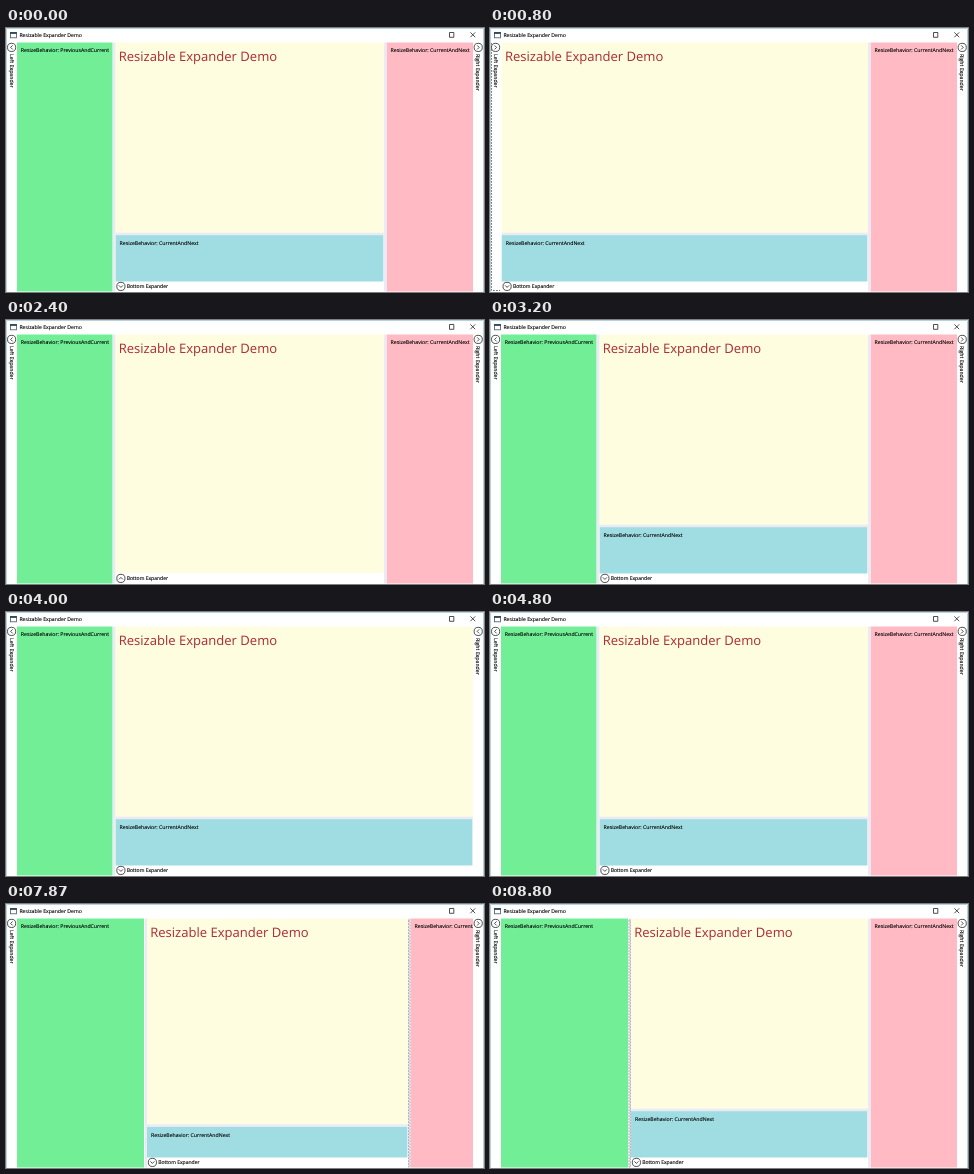
An HTML page that plays this animation: 478x264 px, repeating every 9590 ms.

```html
<!DOCTYPE html>
<html lang="en">
<head>
<meta charset="utf-8">
<title>Resizable Expander Demo</title>
<style>
html, body { margin: 0; width: 100%; height: 100%; overflow: hidden; background: #fff; }
svg { display: block; font: 5.2px "Open Sans", "Noto Sans", sans-serif; text-rendering: geometricPrecision; }
text { stroke: #000; stroke-width: .12; }
.split { fill: #ebebf6; }
.focus { fill: none; stroke: #999; stroke-width: .7; stroke-dasharray: 1.8 1.2; }
.icon { fill: none; stroke: #222; stroke-width: .8; }
</style>
</head>
<body>
<svg width="478" height="264" viewBox="0 0 478 264">
  <rect id="left" x="11" y="14.5" height="249" fill="#72ee97"/>
  <rect id="main" y="14.5" fill="#fffddf"/>
  <rect id="bottom" fill="#a0dde3"/>
  <rect id="right" y="14.5" height="249" fill="#ffbac4"/>
  <rect id="splitL" class="split" y="14.5" width="2.5" height="249"/>
  <rect id="splitB" class="split" height="2.5"/>
  <rect id="splitR" class="split" y="14.5" width="2.5" height="249"/>
  <rect id="focusL" class="focus" y="16" width="1.5" height="247"/>
  <rect id="focusB" class="focus" height="2" style="stroke:#222"/>
  <rect id="focusR" class="focus" y="16" width="1.5" height="247"/>
  <text id="heading" y="33" font-size="13.05" fill="#aa2a35" style="stroke:none">Resizable Expander Demo</text>
  <text id="labelL" x="14.8" y="24.2">ResizeBehavior: PreviousAndCurrent</text>
  <text id="labelB">ResizeBehavior: CurrentAndNext</text>
  <text id="labelR" y="24.2">ResizeBehavior: CurrentAndNext</text>

  <rect x="467" y="14" width="11" height="250" fill="#fff"/>
  <path id="focusHead" class="focus" d="M1.5 15V262.5H10" style="stroke:#444"/>
  <g transform="translate(5.6 19.4)">
    <circle class="icon" r="4.1" style="fill:#fff"/><path id="arrowL" class="icon" d="M1-2L-1 0L1 2"/>
    <text transform="translate(-2.1 6.6) rotate(90)">Left Expander</text>
  </g>
  <g transform="translate(472.2 19.4)">
    <circle class="icon" r="4.1" style="fill:#fff"/><path id="arrowR" class="icon" d="M-1-2L1 0L-1 2"/>
    <text transform="translate(-2.1 6.6) rotate(90)">Right Expander</text>
  </g>
  <g id="headB">
    <circle class="icon" r="4.1"/><path id="arrowB" class="icon" d="M-2-1L0 1L2-1"/>
    <text x="5.8" y="2" font-size="5.05">Bottom Expander</text>
  </g>

  <rect x="4.4" y="4.4" width="6" height="5.4" fill="#fff" stroke="#456" stroke-width=".8"/>
  <path d="M4 5H10.8" stroke="#345" stroke-width="1.8"/>
  <text x="13.4" y="8.8" font-size="5.15">Resizable Expander Demo</text>
  <path class="icon" d="M443.5 4.5H447.8V9.3H443.5ZM464.4 4.4L469.2 9.2M469.2 4.4L464.4 9.2"/>
  <path d="M.5 264V.5H477.5V264" fill="none" stroke="#b4d3dc"/>
</svg>
<script>
const LOOP = 9590;
const el = id => document.getElementById(id);
const set = (id, attrs) => { for (const k in attrs) el(id).setAttribute(k, attrs[k]); };
const show = (id, on) => { el(id).style.display = on ? "" : "none"; };
const within = (t, a, b) => t >= a && t < b;
const part = (step, start, count) => Math.min(1, Math.max(0, (step - start) / count));

function draw(t) {
  const step = Math.floor(t * .015 + .06);   // drags advance 15 times a second
  const openL = !within(t, 800, 1600);
  const openB = !within(t, 2400, 3200);
  const openR = !within(t, 4000, 4800);

  const edgeL = 106.5 + 31.5 * part(step, 83, 8);
  const top = 207 + (t < 8800 ? 15.5 * part(step, 91, 8) : 0);
  const edgeR = 380.5 + (t < 8000 ? 24 * part(step, 99, 9) : 0);

  const x = openL ? edgeL + 3 : 11.7;
  const width = (openR ? edgeR - 2.5 : 467) - x;

  set("left", { width: edgeL - 11 });
  set("main", { x, width, height: (openB ? top - 2 : 253) - 14.5 });
  set("bottom", { x, width: width - .6, y: top, height: 253.5 - top });
  set("right", { x: edgeR, width: Math.max(0, 467 - edgeR) });
  set("splitL", { x: edgeL + .5 });
  set("splitB", { x, width, y: top - 2.3 });
  set("splitR", { x: edgeR - 2.5 });
  set("focusL", { x: edgeL + 1 });
  set("focusB", { x: x + .5, width: width - 1, y: top - 2.2 });
  set("focusR", { x: edgeR - 2 });
  set("heading", { x: x + 3.2 });
  set("labelB", { x: x + 4.1, y: top + 10 });
  set("labelR", { x: edgeR + 4.1 });
  set("headB", { transform: `translate(${x + 5.4} 258.4)` });
  set("arrowL", { transform: `scale(${openL ? 1 : -1} 1)` });
  set("arrowR", { transform: `scale(${openR ? 1 : -1} 1)` });
  set("arrowB", { transform: `scale(1 ${openB ? 1 : -1})` });

  for (const id of ["left", "splitL", "labelL"]) show(id, openL);
  for (const id of ["bottom", "splitB", "labelB"]) show(id, openB);
  for (const id of ["right", "splitR", "labelR"]) show(id, openR);
  show("focusHead", !openL);
  show("focusL", within(step, 84, 92) || t >= 8800);
  show("focusB", within(step, 92, 100) || within(t, 8000, 8800));
  show("focusR", step >= 100 && t < 8000);
}

const start = performance.now();
function tick() {
  draw((performance.now() - start) % LOOP);
  requestAnimationFrame(tick);
}
tick();
</script>
</body>
</html>
```
